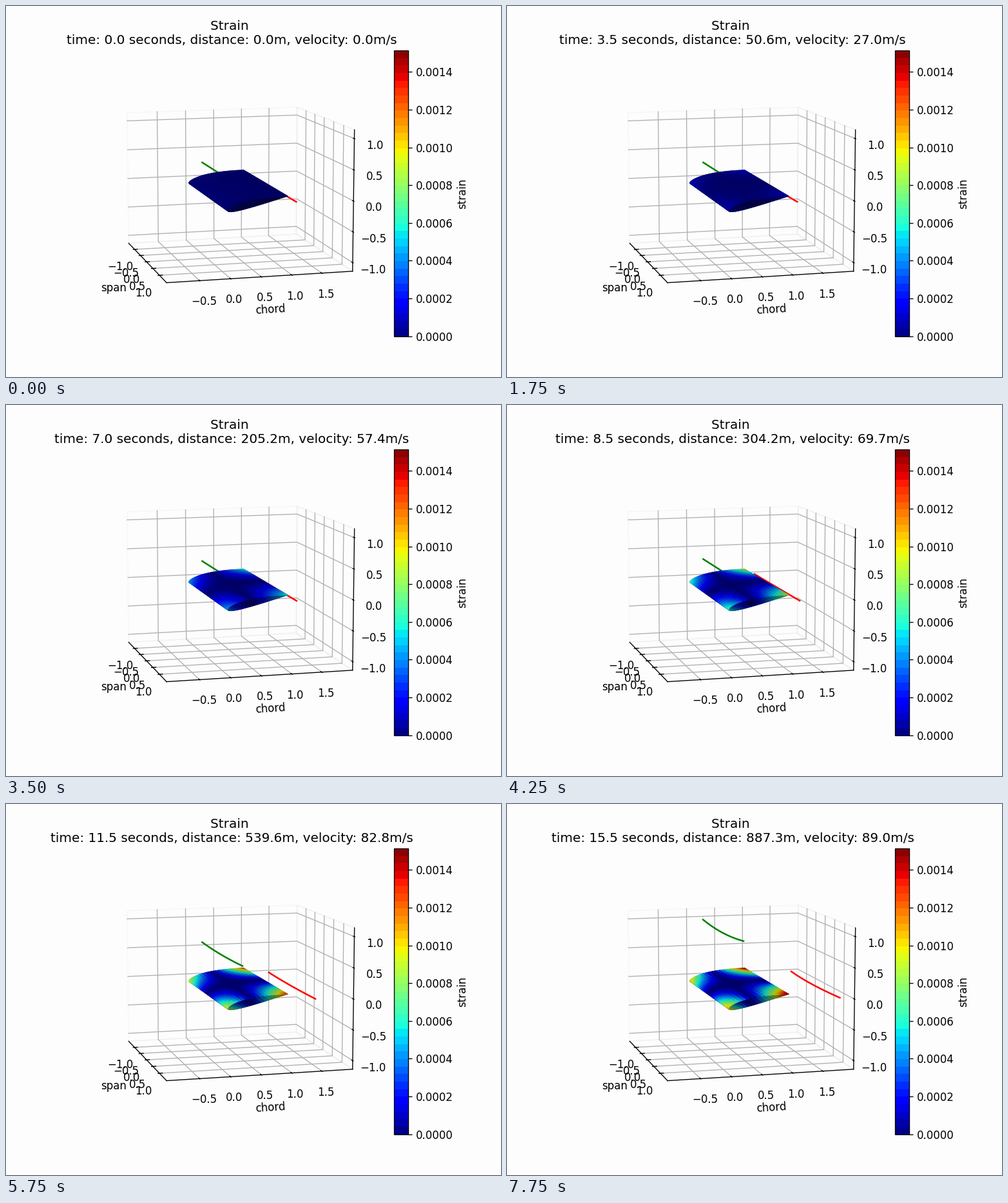
Animation of 768x576 px, one loop 8000 ms. Source, as a matplotlib script:

```python
import numpy as np
import matplotlib
import matplotlib.pyplot as plt
from matplotlib.animation import FuncAnimation
from matplotlib.collections import LineCollection, PolyCollection

W, H, DPI = 768, 576, 120
FRAMES, INTERVAL, DT = 32, 250, 0.5
BG = "#fdfdfd"
JET = matplotlib.colormaps["jet"]

# camera, in data units centred on the plot box
ELEV, AZIM = np.radians(10), np.radians(-15)
DIST, FOCAL, X0, Y0 = 25.55, 2398, 356.9, 284.6
VIEW = np.array([np.cos(ELEV) * np.cos(AZIM), np.cos(ELEV) * np.sin(AZIM), np.sin(ELEV)])
RIGHT = np.array([-np.sin(AZIM), np.cos(AZIM), 0])
UP = np.cross(VIEW, RIGHT)

BOX, BOX_Z = 1.52, 1.14      # half sizes of the drawn box
CHORD_MID = 0.495
SPAN = 1.325                 # half span of the wing
MAX_STRAIN = 0.001514


def project(s, c, z):
    """Span, chord and height to stage pixels (y down)."""
    p = np.stack(np.broadcast_arrays(s, c, z), axis=-1).astype(float)
    scale = FOCAL / (DIST - p @ VIEW)
    return np.stack([X0 + scale * (p @ RIGHT), Y0 - scale * (p @ UP)], axis=-1)


def path(*points):
    return project(*np.array(points, float).T)


fig = plt.figure(figsize=(W / DPI, H / DPI), dpi=DPI, facecolor=BG)
ax = fig.add_axes([0, 0, 1, 1])
ax.set_xlim(0, W)
ax.set_ylim(H, 0)
ax.axis("off")


def strokes(lines, color, zorder):
    ax.add_collection(LineCollection(lines, colors=color, linewidths=0.8,
                                     capstyle="projecting", zorder=zorder))


def label(x, y, text, **kw):
    opts = dict(ha="center", va="center_baseline", fontsize=10, zorder=6)
    opts.update(kw)
    return ax.text(x, y, text, **opts)


def num(v):
    return f"{v:.1f}".replace("-", "\u2212")


def draw_box():
    b, h = BOX, BOX_Z
    panes = [
        ([(-b, -b, -h), (-b, b, -h), (-b, b, h), (-b, -b, h)], 0.95),
        ([(-b, b, -h), (b, b, -h), (b, b, h), (-b, b, h)], 0.90),
        ([(-b, -b, -h), (b, -b, -h), (b, b, -h), (-b, b, -h)], 0.925),
    ]
    for corners, grey in panes:
        ax.add_patch(plt.Polygon(path(*corners), fill=False, lw=1, zorder=1,
                                 ec=(grey, grey, grey, 0.5)))

    inner, outer = 0.049, 0.024
    grid, ticks = [], []
    for i in range(5):
        v = -1 + 0.5 * i
        c = v + 1 - CHORD_MID - 0.5
        grid += [path((v, -b, -h), (v, b, -h), (v, b, h)),
                 path((b, c, -h), (-b, c, -h), (-b, c, h)),
                 path((b, b, v), (-b, b, v), (-b, -b, v))]
        ticks += [path((v, -b - outer, -h), (v, -b + inner, -h)),
                  path((b + outer, c, -h), (b - inner, c, -h)),
                  path((b + outer, b, v), (b - inner, b, v))]
        label(177 + 9.1 * i, 402.5 + 10.35 * i, num(v))
        label(307 + 47.25 * i, 457 - 2.8 * i, num(v + 0.5))
        label(569.2 + 0.8 * i, 408 - 48.25 * i, num(v))
    strokes(grid, "#b0b0b0", 2)
    axes = [path((-b, -b, -h), (b, -b, -h)), path((b, -b, -h), (b, b, -h)),
            path((b, b, -h), (b, b, h))]
    strokes(axes + ticks, "black", 2.5)
    label(167.5, 443, "span", va="baseline")
    label(410.5, 477, "chord", va="baseline", rotation=3.6, rotation_mode="anchor")


def draw_colorbar():
    left, right, top, bottom = 602, 624.2, 69.1, 512.6
    bands = 38
    edges = np.linspace(bottom, top, bands + 1)
    for i in range(bands):
        ax.add_patch(plt.Rectangle((left, edges[i]), right - left, edges[i + 1] - edges[i],
                                   color=JET((i + 0.5) / bands), lw=0, aa=False, zorder=3))
    ax.add_patch(plt.Rectangle((left, top), right - left, bottom - top,
                               fill=False, ec="black", lw=0.8, zorder=4))
    for i in range(8):
        value = 0.0002 * i
        y = bottom + (top - bottom) * value / MAX_STRAIN
        ax.plot([right, right + 5.8], [y, y], color="black", lw=0.8,
                solid_capstyle="butt", zorder=4)
        label(right + 11.7, y, f"{value:.4f}", ha="left")
    label(713.5, 291, "strain", va="baseline", rotation=90, rotation_mode="anchor")


def airfoil(x, side):
    """Cambered profile height, side +1 above and -1 below."""
    thick = 0.6 * (0.2969 * np.sqrt(x) - 0.126 * x - 0.3516 * x**2
                   + 0.2843 * x**3 - 0.1036 * x**4)
    camber = np.where(x < 0.4, 0.125 * (0.8 * x - x**2),
                      0.0556 * (0.2 + 0.8 * x - x**2))
    return camber + side * thick


def build_wing(n_chord=24, n_span=24):
    """Quads, their strain pattern (0..1) and their light factors."""
    pitch = np.radians(10.8)
    x = (1 - np.cos(np.linspace(0, np.pi, n_chord + 1))) / 2
    s = np.linspace(-SPAN, SPAN, n_span + 1)
    quads, pattern, light = [], [], []
    for side in (-1, 1):
        z = airfoil(x, side)
        c = (x - 0.5) * np.cos(pitch) - z * np.sin(pitch)
        z = (x - 0.5) * np.sin(pitch) + z * np.cos(pitch)
        dc, dz = np.diff(c), np.diff(z)
        shade = side * (0.667 * dz + 0.333 * dc) / np.hypot(dc, dz)
        pts = project(s[:, None], c[None, :], z[None, :])
        for i in range(n_span):
            u = abs(s[i] + s[i + 1]) / 2 / SPAN
            for j in range(n_chord):
                quads.append([pts[i, j], pts[i, j + 1], pts[i + 1, j + 1], pts[i + 1, j]])
                arm = abs((x[j] + x[j + 1]) / 2 - 0.42) / 0.58
                pattern.append(u**1.2 * arm)
                light.append(0.65 + 0.35 * shade[j])
    return quads, np.array(pattern), np.array(light)


def hermite(t, knots, values, slopes):
    k = np.clip(np.searchsorted(knots, t, side="right") - 1, 0, len(knots) - 2)
    h = knots[k + 1] - knots[k]
    u = (t - knots[k]) / h
    return ((1 + 2 * u) * (1 - u)**2 * values[k] + u * (1 - u)**2 * h * slopes[k]
            + u**2 * (3 - 2 * u) * values[k + 1] + u**2 * (u - 1) * h * slopes[k + 1])


def build_run():
    """Time, distance and velocity of the run at each step."""
    knots = np.array([0, 2, 5, 7, 9.5, 13.5, 15.5])
    speeds = np.array([0, 14.4, 39.7, 57.4, 75.6, 86.8, 89.0])
    slopes = np.array([3.5, 8.3, 8.54, 9.0, 4.7, 1.5, 0.7])
    marks = np.array([0, 16.5, 103.8, 205.2, 378.7, 710.7, 887.3])
    t = np.arange(FRAMES) * DT
    v = hermite(t, knots, speeds, slopes)
    d = np.cumsum(v) * DT
    d += np.interp(t, knots, marks - d[(knots / DT).astype(int)])
    return t, d, v


def load(t):
    """Offset of both load curves: a soft start, then a slow flattening."""
    rise = 0.0833 * np.log1p(np.exp((t - 8.8) / 0.7))
    return rise - 0.000706 * max(t - 9.5, 0)**2.68


draw_box()
draw_colorbar()
title = label(350.2, 59.1, "", va="baseline", fontsize=12)
quads, pattern, light = build_wing()
lift, = ax.plot([], [], color="green", lw=1.5, zorder=4)
drag, = ax.plot([], [], color="red", lw=1.5, zorder=4)
wing = ax.add_collection(PolyCollection(quads, linewidths=0.4, zorder=5))
times, dists, speeds = build_run()
stations = np.linspace(-SPAN, SPAN, 31)


def update(i):
    t, d, v = times[i], dists[i], speeds[i]
    title.set_text(f"Strain \ntime: {t:.1f} seconds, distance: {d:.1f}m, velocity: {v:.1f}m/s")

    strain = 0.00155 * (v / 89)**2.2 * pattern
    colors = JET(np.clip(strain / MAX_STRAIN, 0, 1))
    colors[:, :3] *= light[:, None]
    wing.set_facecolor(colors)
    wing.set_edgecolor(colors)

    bend = load(t) * (1 - 0.065 * (1 - (stations / SPAN)**2))
    lift.set_data(*project(stations, -0.25, 0.257 + bend).T)
    drag.set_data(*project(stations, 0.63 + bend, -0.004).T)
    return title, wing, lift, drag


anim = FuncAnimation(fig, update, frames=FRAMES, interval=INTERVAL,
                     repeat=True, repeat_delay=0, blit=False)
plt.show()
```
